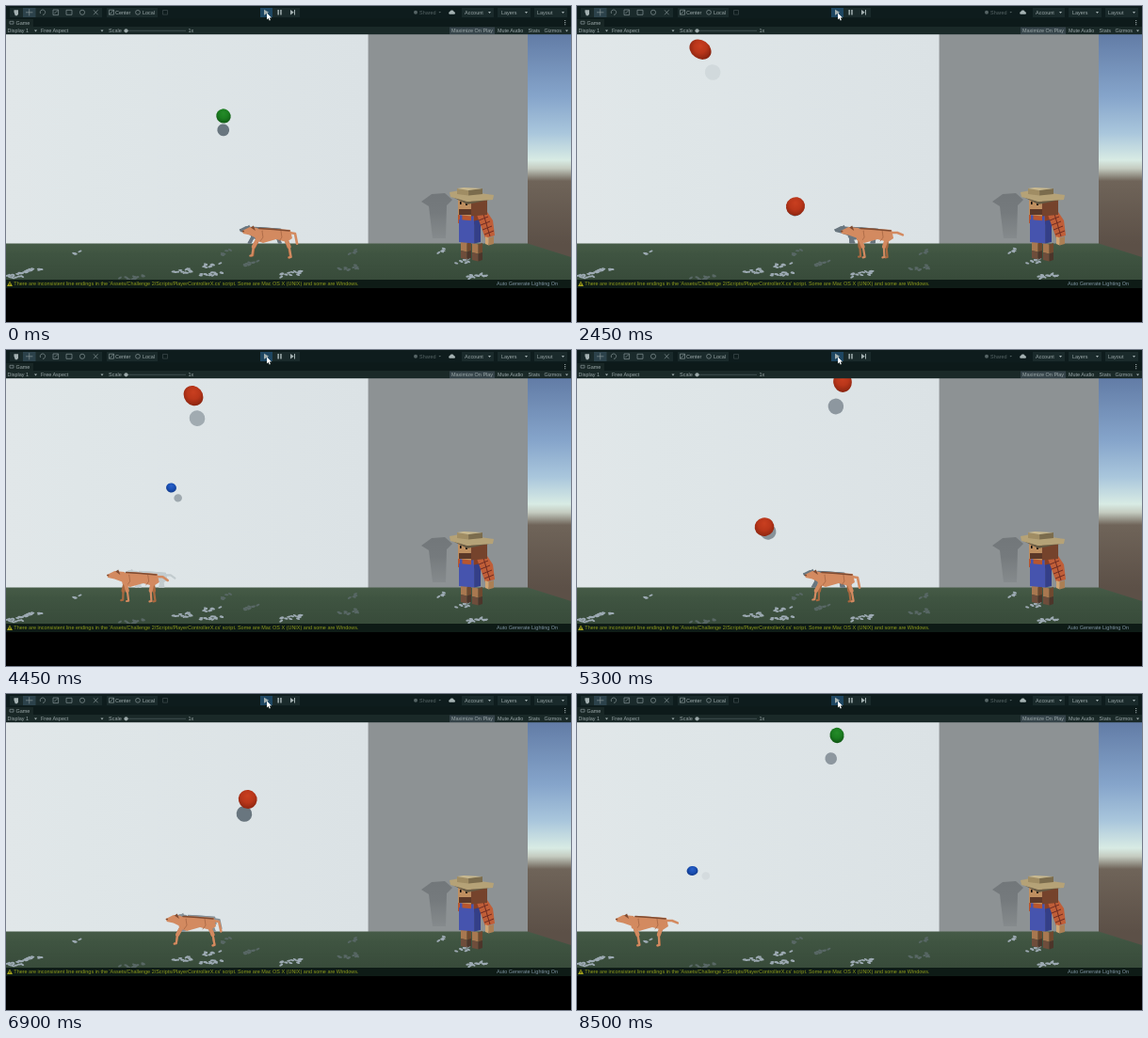
Animation of 600 by 336 pixels, one loop 8.55 s. Source, as an HTML page with a canvas:

```html
<!DOCTYPE html>
<html lang="en">
<head>
<meta charset="utf-8">
<title>Fetch game</title>
<style>
html, body { margin: 0; width: 100%; height: 100%; overflow: hidden; background: #000; }
canvas, svg { position: absolute; left: 0; top: 0; width: 600px; height: 336px; }
text { font: 5.48px "Liberation Sans", Arial, sans-serif; fill: #9ca9aa; }
.dim { fill: #566465; }
.icon { fill: none; stroke: #869495; stroke-width: .7; }
.solid { fill: #a4b1b2; }
.btn { fill: #1a2a2b; }
</style>
</head>
<body>
<canvas id="game"></canvas>
<svg viewBox="0 0 600 336">
  <rect width="600" height="14" fill="#0e1c1d"/>
  <rect y="13.5" width="600" height="8.5" fill="#0d1a1a"/>
  <rect y="14" width="29" height="8" fill="#182625"/>
  <rect y="22" width="600" height="8.2" fill="#1a2928"/>
  <rect y="291" width="600" height="9" fill="#0e1b16"/>
  <rect y="300" width="600" height="36" fill="#000"/>

  <g class="btn">
    <rect x="4" y="2" width="98" height="10"/>
    <rect x="107" y="2" width="54" height="10"/>
    <rect x="270" y="2" width="42" height="10"/>
    <rect x="484" y="2" width="34" height="10"/>
    <rect x="522" y="2" width="35" height="10"/>
    <rect x="561" y="2" width="35" height="10"/>
  </g>
  <rect x="18" y="2" width="13.5" height="10" fill="#2c424b"/>
  <rect x="270" y="2" width="13" height="10" fill="#1e4661"/>
  <path class="solid" d="M8.5 6.5V4.2h4.5v4L12 10.2H9.8z"/>
  <g class="icon">
    <path d="M21 6.8h7.4M24.7 3.2v7.2"/>
    <path d="M36.6 8a2.7 2.7 0 1 1 2.4 1.4"/>
    <path d="M50 4h5.6v5.6H50zM51.5 8l3.5-3.5"/>
    <path d="M64 4.3h6v5h-6z"/>
    <circle cx="81" cy="6.8" r="2.6"/>
    <path d="M93 4.3l4.6 5M97.6 4.3l-4.6 5"/>
    <path d="M109.5 4.2h5v5h-5zM109.5 9.2l5-5"/>
    <circle cx="140" cy="6.8" r="2.4"/>
    <path d="M166.5 4.5h5v4.6h-5z" stroke="#3f4d4e"/>
    <path d="M4 16.3h4v2.8H4z"/>
  </g>
  <g class="solid">
    <path d="M274 3.8l5 3-5 3z"/>
    <path d="M288.4 4h1.5v5.5h-1.5zM291.2 4h1.5v5.5h-1.5z"/>
    <path d="M302 4l3.8 2.8L302 9.6zM306 4h1v5.6h-1z"/>
    <path d="M471 8.8a1.5 1.5 0 0 1 .3-2.8 2.4 2.4 0 0 1 4.4 0 1.5 1.5 0 0 1 .5 2.8z"/>
    <path id="arrow" d="M512-1h3l-1.5 2z" transform="translate(0 7)"/>
    <use href="#arrow" x="39"/><use href="#arrow" x="78"/>
    <use href="#arrow" x="-482" y="19.5"/><use href="#arrow" x="-411.5" y="19.5"/>
    <use href="#arrow" x="82" y="19.5"/>
  </g>
  <path d="M593.7 15v6" stroke="#a4b1b2" stroke-width="1.1" stroke-dasharray="1.1 1"/>
  <circle cx="435" cy="6.8" r="2" fill="#566465"/>
  <path d="M459.5 6h2.4l-1.2 1.6z" fill="#566465"/>
  <path d="M277 7.6v6.8l1.6-1.4 1.1 2.5 1.2-.5-1.1-2.4h2.2z" fill="#fff"/>

  <text x="116" y="8.8">Center</text>
  <text x="145" y="8.8">Local</text>
  <text x="439" y="8.8" class="dim">Shared</text>
  <text x="487" y="8.8">Account</text>
  <text x="526" y="8.8">Layers</text>
  <text x="564" y="8.8">Layout</text>
  <text x="10.5" y="19.6">Game</text>
  <text x="1.5" y="28">Display 1</text>
  <text x="37" y="28">Free Aspect</text>
  <text x="109" y="28">Scale</text>
  <path d="M127 26.3h64" stroke="#4b5858" stroke-width=".8"/>
  <circle cx="127.5" cy="26.3" r="2.1" fill="#9ca9aa"/>
  <text x="193.5" y="28">1x</text>
  <rect x="471" y="22.5" width="48" height="7.5" fill="#36444a"/>
  <text x="473" y="28">Maximize On Play</text>
  <text x="522" y="28">Mute Audio</text>
  <text x="554.5" y="28">Stats</text>
  <text x="571.5" y="28">Gizmos</text>
  <path d="M1 298l3-5.6 3 5.6z" fill="#a8a61c"/>
  <path d="M4 294.2v2.6" stroke="#14180a" stroke-width=".8"/>
  <text x="8.3" y="297.1" style="fill:#8f9c1c">There are inconsistent line endings in the 'Assets/Challenge 2/Scripts/PlayerControllerX.cs' script. Some are Mac OS X (UNIX) and some are Windows.</text>
  <text x="521" y="297.1" style="fill:#7f95a3">Auto Generate Lighting On</text>
</svg>
<script>
const LOOP = 8550, STEP = 50, FLOOR = 252.5;
const canvas = document.getElementById('game');
const ratio = window.devicePixelRatio || 1;
canvas.width = 600 * ratio;
canvas.height = 336 * ratio;
const g = canvas.getContext('2d');

const clamp = (v, lo, hi) => Math.min(hi, Math.max(lo, v));

function gradient(x0, y0, x1, y1, stops) {
  const fill = g.createLinearGradient(x0, y0, x1, y1);
  stops.forEach(([at, color]) => fill.addColorStop(at, color));
  return fill;
}

function rect(x, y, w, h, fill) {
  g.fillStyle = fill;
  g.fillRect(x, y, w, h);
}

function poly(fill, ...pts) {
  g.beginPath();
  for (let i = 0; i < pts.length; i += 2) g.lineTo(pts[i], pts[i + 1]);
  g.closePath();
  g.fillStyle = fill;
  g.fill();
}

function line(color, width, ...pts) {
  g.beginPath();
  for (let i = 0; i < pts.length; i += 2) g.lineTo(pts[i], pts[i + 1]);
  g.strokeStyle = color;
  g.lineWidth = width;
  g.stroke();
}

function oval(fill, x, y, rx, ry, turn = 0) {
  g.beginPath();
  g.ellipse(x, y, rx, ry, turn, 0, 7);
  g.fillStyle = fill;
  g.fill();
}

function clipTo(x, y, w, h, paint) {
  g.save();
  g.beginPath();
  g.rect(x, y, w, h);
  g.clip();
  paint();
  g.restore();
}

const FLOWERS = [[28, 281], [8, 287], [76, 261], [185, 283], [219, 275], [217, 285], [303, 285], [461, 261], [485, 272], [503, 286]];
const WEEDS = [[262, 273], [234, 262], [367, 262], [363, 279], [135, 289]];

function drawGround() {
  poly(gradient(0, FLOOR, 0, 291, [[0, '#465b47'], [.3, '#3f5441'], [1, '#384b3a']]),
    0, FLOOR, 554, FLOOR, 600, 267, 600, 292, 0, 292);
  let seed = 11;
  const rnd = () => (seed = seed * 16807 % 2147483647) / 2147483647 * 2 - 1;
  // Nearer patches are wider and fuller.
  const patch = ([x, y], color) => {
    const w = (y - 250) * .36;
    for (let i = 0; i < w; i++) {
      const dx = rnd();
      oval(color, x + dx * w, y - dx * 2 + rnd() * 2, 2.2, 1, rnd() * .6);
    }
  };
  WEEDS.forEach(p => patch(p, '#596866'));
  FLOWERS.forEach(p => patch(p, '#9daab3'));
}

function drawRoom() {
  rect(0, 30, 385, 224, gradient(0, 0, 385, 0, [[0, '#e1e7e9'], [.2, '#dfe6e8'], [1, '#dbe2e5']]));
  rect(384.6, 30, 169.4, 224, '#8d9294');
  rect(554, 30, 46, 262, gradient(0, 30, 0, 253, [
    [0, '#627ca6'], [.3, '#86a5cb'], [.47, '#a9c6dc'], [.6, '#d8ebe4'], [.64, '#c4cbc0'], [.7, '#6f6459'], [1, '#5c5047']
  ]));
  drawGround();
  const dusk = gradient(0, 200, 0, 248, [[0, '#72777a'], [.4, '#757a7d'], [1, '#868b8d']]);
  poly(dusk, 441, 208, 452, 200, 466, 199, 474, 206, 468, 212, 467, 247, 453, 247, 449, 213);
}

// A box seen corner on: lit front at the left, darker side at the right.
function block(x, y, w, h, split, front, side) {
  const c = x + w * split, dip = 1.5;
  poly(front, x, y, c, y + dip, c, y + h + dip, x, y + h);
  poly(side, c, y + dip, x + w, y, x + w, y + h, c, y + h + dip);
}

function drawFarmer() {
  for (const [x, y] of [[483, 250], [495, 252]]) {
    block(x, y, 11, 10, .6, '#a87850', '#70492f');
    block(x, y + 10, 11, 8, .6, '#6e4d3b', '#4c352a');
  }
  block(480, 219, 22, 12, .75, '#b8562f', '#8a3f25');
  block(481, 227, 23, 24, .7, '#4654ae', '#343f88');
  for (const x of [482, 494]) rect(x, 221, 2.5, 8, '#4654ae');
  poly('#c05e38', 500, 222, 511, 219, 517, 228, 519, 244, 509, 247);
  for (let i = 0; i < 4; i++) line('#6f2c22', 1, 502 + i * 2, 228 + i * 5, 512 + i * 2, 224 + i * 5);
  line('#6f2c22', 1, 507, 221, 514, 245);
  block(509, 245, 9, 8, .4, '#d0a473', '#ab7f55');
  block(480, 204, 31, 18, .45, '#bf8f60', '#75432c');
  rect(481, 216, 13, 6, '#5b3828');
  rect(482, 208, 1.6, 3, '#15110f');
  rect(488, 209, 2, 3, '#15110f');
  poly('#665a43', 472, 202, 490, 208, 518, 205, 490, 211);
  poly('#b5a277', 471, 198, 482, 196, 518, 201, 517, 206, 490, 208, 472, 203);
  block(479, 194, 27, 6, .45, '#a08d64', '#7b6c4d');
  poly('#c9b98f', 479, 194, 486, 193, 506, 194, 491, 196);
}

// Wall shadows shrink toward one point of the wall.
const CAST = { x: 229, y: 228, k: .866 };
const castX = x => CAST.x + (x - CAST.x) * CAST.k;
const castY = y => CAST.y + (y - CAST.y) * CAST.k;

function shade(x, y) {
  const m = clamp((x - 127) / 110, 0, .92) * (y < 80 ? .7 : 1);
  const mix = (a, b) => Math.round(a + (b - a) * m);
  return `rgb(${mix(223, 95)},${mix(230, 108)},${mix(232, 118)})`;
}

const TINTS = {
  red: { r: 9.8, colors: ['#c93f20', '#b9361a', '#86230f'] },
  green: { r: 7.5, colors: ['#258c29', '#1b7d20', '#0f5213'] },
  blue: { r: 5, colors: ['#2a60c8', '#1a50b5', '#103683'] }
};

// tint, x, start time
const BALLS = [
  ['green', 231, -902], ['blue', 322, 234], ['red', 232, 1125], ['red', 131, 2105], ['blue', 175.5, 3400],
  ['red', 199, 4071], ['red', 282, 5290], ['red', 256.7, 6026], ['blue', 122.5, 7271], ['green', 276, 8187]
];

function drawBall([tint, x, start], t) {
  const age = (t - start) / 1000, y = 34 + 102 * age * age;
  if (age < 0 || y > 256) return;
  const { r, colors } = TINTS[tint];
  // Perspective stretches things away from the middle of the view.
  const dx = x - 300, dy = y - 168;
  const turn = Math.atan2(dy, dx), stretch = 1 + (dx * dx + dy * dy) * 6e-6;
  const sx = castX(x), sy = castY(y);
  oval(shade(sx, sy), sx, sy, r * .86, r * .84, turn);
  const fill = g.createRadialGradient(x, y - r * .4, 0, x, y - r * .2, r * 1.35);
  colors.forEach((c, i) => fill.addColorStop(i / 2, c));
  oval(fill, x, y, r * stretch, r, turn);
}

const DOG_START = 495, DOG_SPEED = .282, STRIDE = 295;
const DOGS = [-759, 304, 1805, 3190, 4509, 5854, 7007];

// 0 with the legs gathered, 1 at full stretch
const reachAt = age => .5 - .5 * Math.cos((age - 37) / STRIDE * 2 * Math.PI);

function leg(color, x, foot, lift, bend) {
  const y = 267 - lift, knee = (x + foot) / 2 + bend;
  line(color, 4, x, 247, knee, 256);
  line(color, 2.2, knee, 256, foot, y, foot - 2, y + .4);
}

function legs(color, age) {
  const reach = reachAt(age);
  leg(color, -13, -7 - 13 * reach, 2 * reach, 1 - 3 * reach);
  leg(color, 16, 13 + 9 * reach, 0, -2 + 3 * reach);
}

function dogShape(x, age, flat) {
  const reach = reachAt(age), nose = -33 + 3 * reach;
  const tone = c => flat || c;
  const coat = tone('#d38a60'), dark = tone('#7f4b31');
  g.save();
  g.translate(x, 0);
  g.lineCap = g.lineJoin = 'round';
  legs(tone('#a9683f'), age + 45);
  line(coat, 2.6, 20, 241, 27 - reach, 241 + reach, 33 - 5 * reach, 243 + 10 * reach);
  poly(coat, -18, 238, -8, 236, 21, 238, 23, 247, 17, 251, 6, 248, -8, 252, -16, 249);
  poly(coat, nose, 239, nose + 8, 235, -14, 236, -10, 242, -15, 247, nose + 8, 243.5, nose + 1, 242);
  line(dark, 1.6, -12, 236.5, 3, 237.5, 20, 239);
  poly(dark, nose + 9, 235.5, nose + 12, 233.5, nose + 14, 239);
  line(dark, 1.4, nose + .5, 239.5, nose + 1.5, 239.5);
  if (!flat) for (const seam of [-9, 11]) line('#a0613f', .7, seam, 239, seam + 1, 246, seam - 2, 250);
  legs(coat, age);
  g.restore();
}

function eachDog(t, paint) {
  for (const start of DOGS) {
    const age = t - start, x = DOG_START - DOG_SPEED * age;
    if (age >= 0 && x > -45) paint(x, age);
  }
}

function dogShadow(x, age) {
  const cast = (left, width, color) => clipTo(left, 30, width, FLOOR - 30, () => {
    g.translate(CAST.x * (1 - CAST.k), CAST.y * (1 - CAST.k));
    g.scale(CAST.k, CAST.k);
    dogShape(x, age, color);
  });
  if (castX(x) > 120) cast(0, 385, shade(castX(x), 230));
  cast(385, 169, '#72777a');
}

function draw(t) {
  g.setTransform(ratio, 0, 0, ratio, 0, 0);
  clipTo(0, 30, 600, 262, () => {
    drawRoom();
    eachDog(t, dogShadow);
    BALLS.forEach(ball => drawBall(ball, t));
    eachDog(t, (x, age) => dogShape(x, age));
    drawFarmer();
  });
}

const begin = performance.now();
function tick() {
  const t = (performance.now() - begin) % LOOP;
  draw(Math.floor(t / STEP) * STEP);
  requestAnimationFrame(tick);
}
tick();
</script>
</body>
</html>
```
